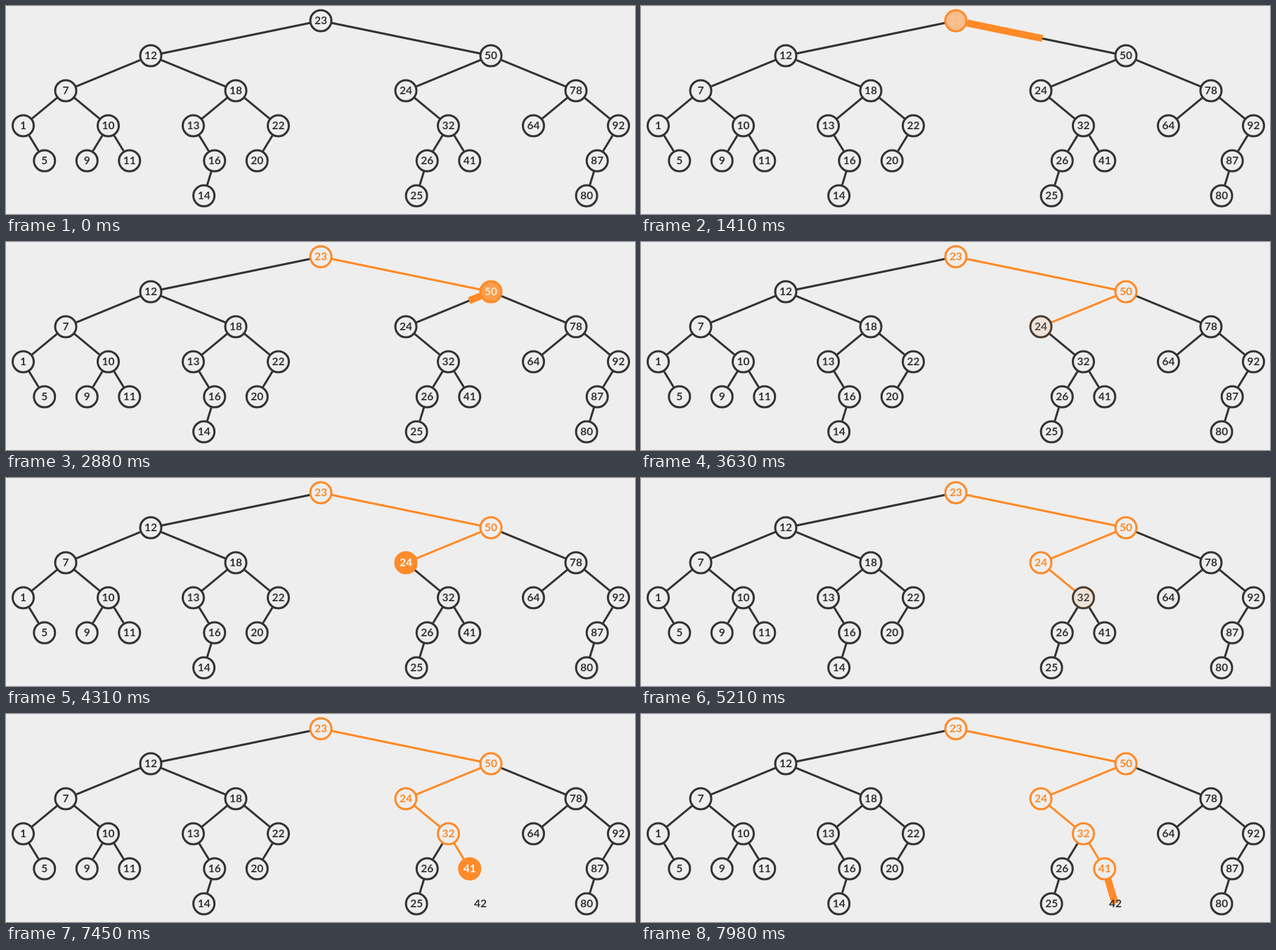
An HTML page with a canvas that plays this animation: 895x297 px, repeating every 8000 ms.

```html
<!DOCTYPE html>
<html lang="en">
<head>
<meta charset="utf-8">
<title>Binary search tree insertion</title>
<style>
  html, body { margin: 0; height: 100%; overflow: hidden; background: #eee; }
  canvas { display: block; }
</style>
</head>
<body>
<canvas id="stage" width="895" height="297"></canvas>
<script>
const ctx = document.getElementById('stage').getContext('2d');
const LOOP = 8000, RADIUS = 16, NEW_KEY = 42, NEW_KEY_AT = 7450;
const BACK = [238, 238, 238], DARK = [51, 51, 51], ORANGE = [255, 138, 39], WHITE = [255, 255, 255];

// Search path: when the node lights up, then when its outgoing edge starts and ends
const path = [
  { key: 23, lit: 500, start: 1037, end: 1780 },
  { key: 50, lit: 2080, start: 2635, end: 3330 },
  { key: 24, lit: 3630, start: 4195, end: 4910 },
  { key: 32, lit: 5210, start: 5775, end: 6480 },
  { key: 41, lit: 6770, start: 7340, end: 8070 }
];
const LIGHT_TIME = 730, LIGHT_LEAD = 220;

const nodes = [];
function insert(key) {
  let parent = null, x = 448, y = 21, gap = 242;
  for (let next = nodes[0]; next; gap /= 2) {
    parent = next;
    const right = key > parent.key;
    x = parent.x + (right ? gap : -gap);
    y = parent.y + 50;
    next = nodes.find(n => n.parent === parent && (n.key > parent.key) === right);
  }
  nodes.push({ key, parent, x, y, step: path.find(s => s.key === key) });
}
[23, 12, 50, 7, 18, 24, 78, 1, 10, 13, 22, 32, 64, 92,
  5, 9, 11, 16, 20, 26, 41, 87, 14, 25, 80, NEW_KEY].forEach(insert);

const clamp = v => Math.min(1, Math.max(0, v));
function ease(v) {
  v = clamp(v);
  return v < 0.5 ? 4 * v ** 3 : 1 - 4 * (1 - v) ** 3;
}
const mix = (a, b, p) => `rgb(${a.map((v, i) => Math.round(v + (b[i] - v) * p))})`;
const lighting = (step, t) => step && t >= step.lit ? ease((t - step.lit + LIGHT_LEAD) / LIGHT_TIME) : 0;
const leaving = (step, t) => step ? ease((t - step.start) / (step.end - step.start)) : 0;

function line(child, part, width, color) {
  const { x, y, parent } = child;
  const dx = x - parent.x, dy = y - parent.y, length = Math.hypot(dx, dy);
  const from = RADIUS / length;
  const to = child.key === NEW_KEY ? 1 : 1 - from;
  const tip = from + (to - from) * part;
  ctx.beginPath();
  ctx.moveTo(parent.x + dx * from, parent.y + dy * from);
  ctx.lineTo(parent.x + dx * tip, parent.y + dy * tip);
  ctx.lineWidth = width;
  ctx.strokeStyle = color;
  ctx.stroke();
}

function drawEdge(node, t) {
  const step = node.parent.step;
  const onPath = step && (node.step || node.key === NEW_KEY);
  const done = onPath && t >= step.end;
  if (node.key !== NEW_KEY) line(node, 1, 3, mix(DARK, ORANGE, done ? 1 : 0));
  if (onPath && !done && t > step.start) line(node, leaving(step, t), 10, mix(ORANGE, ORANGE, 0));
}

function drawNode({ key, x, y, step }, t) {
  const on = lighting(step, t), off = leaving(step, t);
  if (key !== NEW_KEY) {
    ctx.beginPath();
    ctx.arc(x, y, 15, 0, 2 * Math.PI);
    ctx.fillStyle = mix(BACK, ORANGE, on - off);
    ctx.fill();
    ctx.lineWidth = 3;
    ctx.strokeStyle = mix(DARK, ORANGE, on);
    ctx.stroke();
  }
  ctx.fillStyle = off ? mix(WHITE, ORANGE, off) : mix(DARK, WHITE, on);
  ctx.fillText(key, x, y + 5);
}

function draw(now) {
  const t = now % LOOP;
  const shown = nodes.filter(n => n.key !== NEW_KEY || t >= NEW_KEY_AT);
  ctx.fillStyle = mix(BACK, BACK, 0);
  ctx.fillRect(0, 0, 895, 297);
  ctx.font = 'bold 15.5px Lato, sans-serif';
  ctx.textAlign = 'center';
  shown.forEach(n => n.parent && drawEdge(n, t));
  shown.forEach(n => drawNode(n, t));
}

const began = performance.now();
function tick() {
  draw(performance.now() - began);
  requestAnimationFrame(tick);
}
tick();
</script>
</body>
</html>
```
